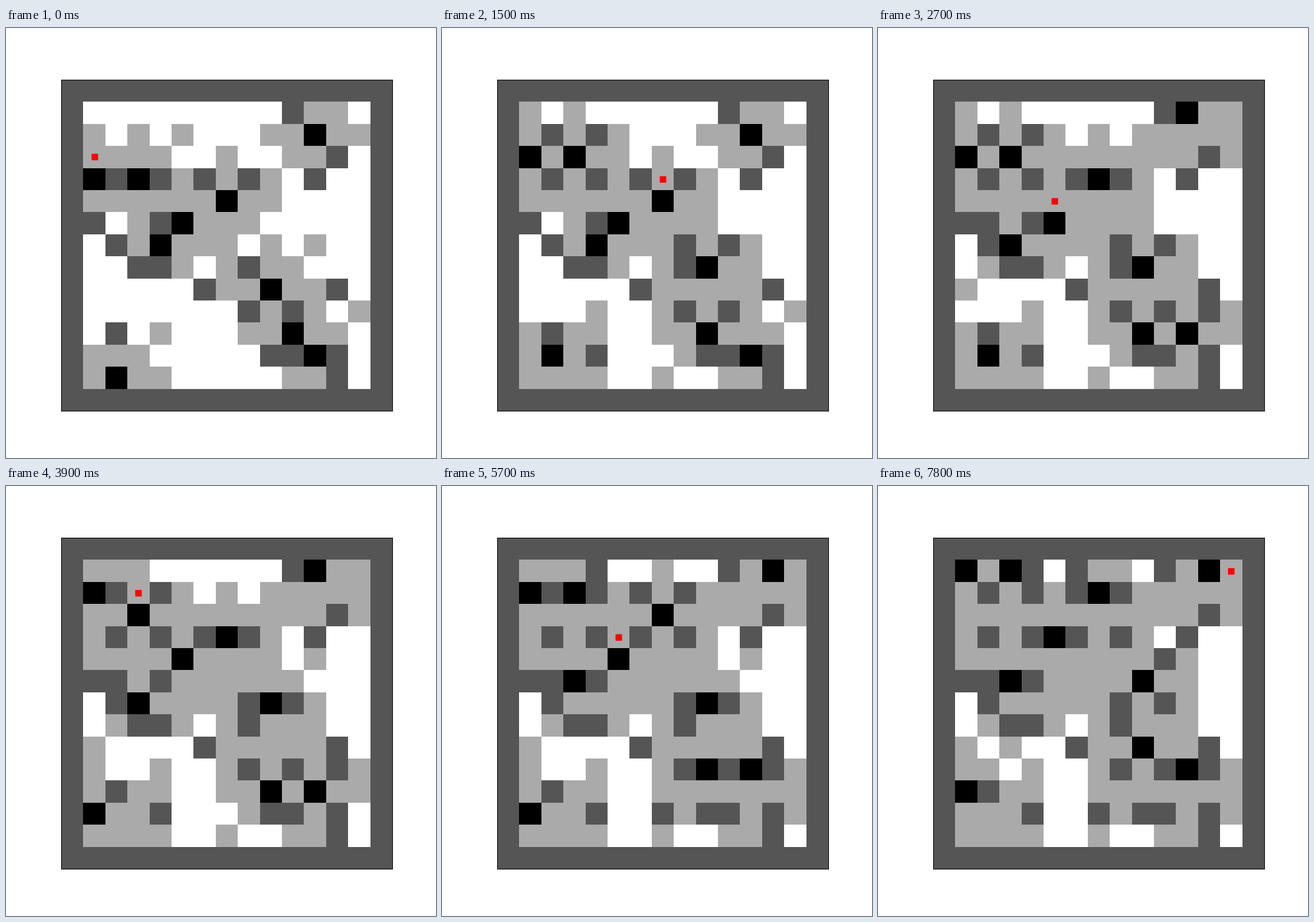
These frames come from a looping animation (748x748 px, 8 s). A matplotlib script:

```python
import matplotlib.pyplot as plt
import numpy as np
from matplotlib.animation import FuncAnimation
from itertools import product

SIZE, DPI = 748, 100
INTERVAL, FRAMES, FRAMES_PER_STEP = 100, 80, 3
SIGHT = 2
AGENT, WALL, OPEN, UNKNOWN = range(4)

# '#' seen wall, '.' seen floor, 'x' unseen wall, ' ' unseen floor
LEVEL = [
    "   x x   #.. ",
    ".x.x.x x.....",
    "....  .  ..# ",
    ".#.#.#.#. #  ",
    ".........x   ",
    "#x.#....     ",
    " #.....x.x.  ",
    "  ##. .#..   ",
    "     #.....# ",
    "       #.#.x.",
    " # .   ..... ",
    "...x  x ##.# ",
    "....     ..# ",
]

# Start cell (row, column) and path of each agent, in turn order
AGENTS = [
    ((3, 0), "UUU"), ((8, 8), "UUU"), ((12, 1), "ULU"), ((3, 2), "UUU"),
    ((10, 9), "LUU"), ((4, 6), "UUU"), ((1, 10), "URR"), ((6, 3), "LUU"),
    ((11, 10), "UUU"), ((5, 4), "UUU"),
]
MOVES = {"U": (-1, 0), "D": (1, 0), "L": (0, -1), "R": (0, 1)}
RAYS = [ray for ray in product((-1, 0, 1), repeat=2) if any(ray)]

tiles = np.array([list(row) for row in LEVEL])
walls = np.isin(tiles, ["#", "x"])
seen_at_start = np.isin(tiles, ["#", "."])


def shift(cell, delta):
    return cell[0] + delta[0], cell[1] + delta[1]


def look_around(cell, seen):
    """Reveal cells along eight rays, each stopped by the first wall."""
    for ray in RAYS:
        spot = cell
        for _ in range(SIGHT):
            spot = shift(spot, ray)
            if not all(0 <= v < len(LEVEL) for v in spot):
                break
            seen[spot] = True
            if walls[spot]:
                break


def next_cell(cells, turn):
    lap, who = divmod(turn, len(AGENTS))
    return who, shift(cells[who], MOVES[AGENTS[who][1][lap]])


def state(step):
    """Grid after the given number of turns, and the cell chosen next."""
    cells = [start for start, _ in AGENTS]
    seen = seen_at_start.copy()
    for turn in range(step):
        who, cell = next_cell(cells, turn)
        cells[who] = cell
        look_around(cell, seen)
    grid = np.where(seen, np.where(walls, WALL, OPEN), UNKNOWN)
    for cell in cells:
        grid[cell] = AGENT
    return np.pad(grid, 1, constant_values=WALL), next_cell(cells, step)[1]


fig = plt.figure(figsize=(SIZE / DPI, SIZE / DPI), dpi=DPI, facecolor="white")
side = 575.96
ax = fig.add_axes([96 / SIZE, 82 / SIZE, side / SIZE, side / SIZE])
ax.set(xticks=[], yticks=[])
image = ax.imshow(state(0)[0], cmap="gray", vmin=AGENT, vmax=UNKNOWN,
                  interpolation="nearest", aspect="auto")
target, = ax.plot([], [], "rs", markersize=7)
ax.set(xlim=(-0.5, 14.5), ylim=(14.5, -0.5))


def draw(frame):
    grid, (row, col) = state(frame // FRAMES_PER_STEP)
    image.set_data(grid)
    target.set_data([col + 1], [row + 1])
    return image, target


anim = FuncAnimation(fig, draw, frames=FRAMES, interval=INTERVAL,
                     repeat=True, repeat_delay=0)
plt.show()
```
